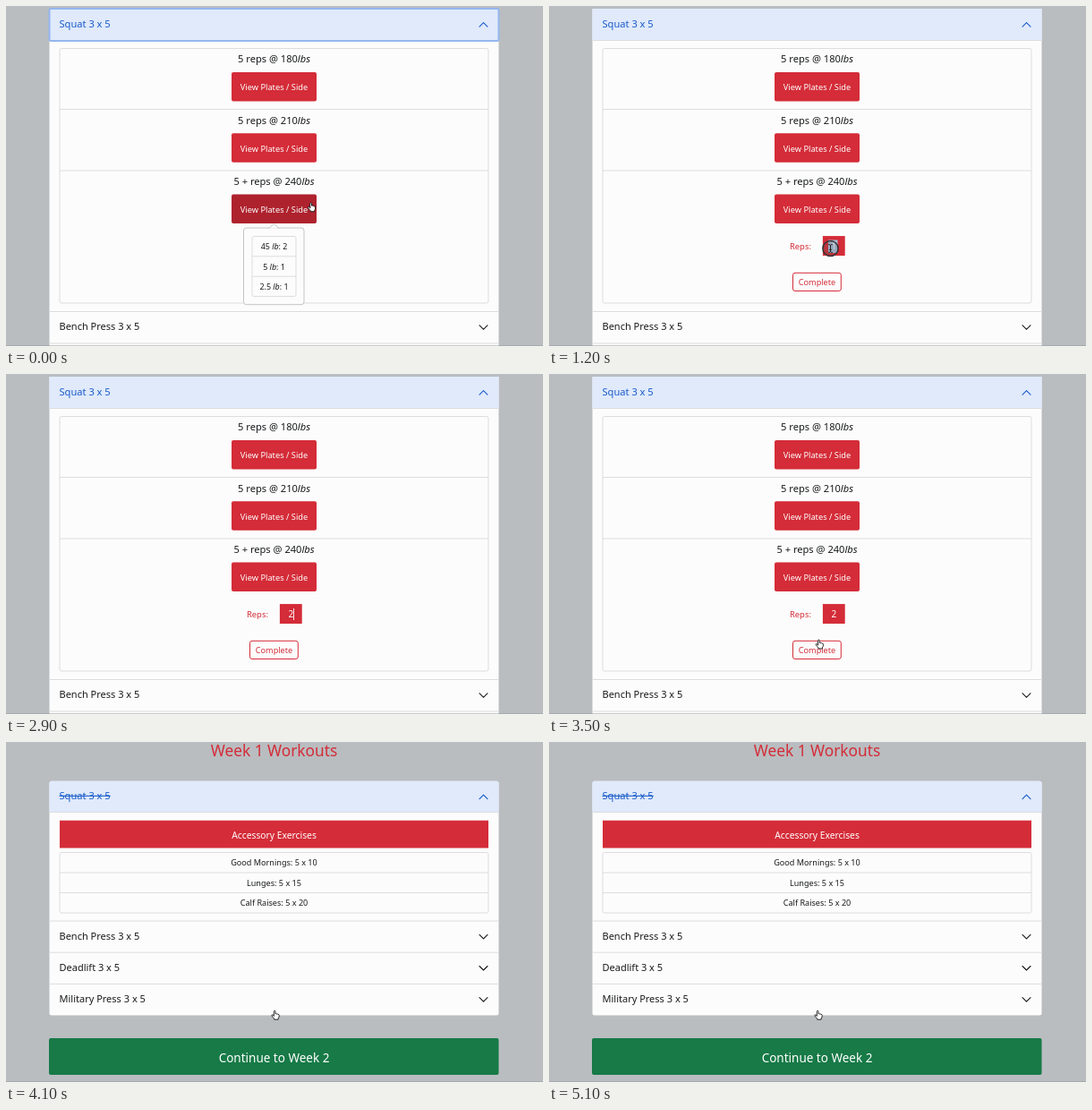
Recreate the animation shown at these times as an HTML page. Size 600 by 380 pixels, loop 5200 ms.

```html
<!DOCTYPE html>
<html lang="en">
<head>
<meta charset="utf-8">
<title>Workout tracker</title>
<style>
  html, body { margin: 0; width: 100%; height: 100%; overflow: hidden; background: #b9bdc0; }
  svg { display: block; width: 600px; height: 380px; }
  text { font-family: "Noto Sans", "Open Sans", sans-serif; white-space: pre; }
</style>
</head>
<body>
<svg id="stage" viewBox="0 0 600 380"></svg>
<script>
const LOOP = 5200;
const RED = '#d42c38', DARK_RED = '#ae222d', BLUE = '#1859c9', INK = '#181a1c';
const PAPER = '#fcfcfc', LINE = '#dddddf', HEADER = '#e0eafb';
const MID = 299.5;
const stage = document.getElementById('stage');

function add(parent, tag, attrs, html = '') {
  const node = document.createElementNS('http://www.w3.org/2000/svg', tag);
  set(node, attrs);
  node.innerHTML = html;
  return parent.appendChild(node);
}
function set(node, attrs) {
  for (const key in attrs) node.setAttribute(key, attrs[key]);
}
const group = (parent, attrs = {}) => add(parent, 'g', attrs);
const rect = (parent, x, y, right, bottom, attrs) =>
  add(parent, 'rect', { x, y, width: right - x, height: bottom - y, ...attrs });
const label = (parent, x, y, size, fill, html, attrs = {}) =>
  add(parent, 'text', { x, y, 'font-size': size, fill, ...attrs }, html);
const centred = (parent, y, size, fill, html, attrs = {}) =>
  label(parent, MID, y, size, fill, html, { 'text-anchor': 'middle', ...attrs });
const rule = (parent, y, x = 49, right = 550) =>
  add(parent, 'path', { d: `M${x} ${y}H${right}`, stroke: LINE });
const chevron = (parent, y, up) => add(parent, 'path', {
  d: up ? `M529 ${y + 2.2}l4.5 -4.5l4.5 4.5` : `M529 ${y - 2.2}l4.5 4.5l4.5 -4.5`,
  fill: 'none', stroke: up ? BLUE : INK, 'stroke-width': 1.1,
  'stroke-linecap': 'round', 'stroke-linejoin': 'round'
});
const medium = { 'font-weight': 500 };
const italic = text => `<tspan font-style="italic">${text}</tspan>`;

function exerciseRow(parent, top, name) {
  rule(parent, top);
  label(parent, 59.5, top + 20.5, 11, INK, name, medium);
  chevron(parent, top + 17.5, false);
}

function listBox(parent, x, top, right, bottom, dividers) {
  rect(parent, x, top, right, bottom, { fill: PAPER, stroke: LINE, rx: 2 });
  dividers.forEach(y => rule(parent, y, x, right));
}

// Set view
const setView = group(stage);
rect(setView, 48.5, 3, 550.5, 381, { fill: PAPER });
rect(setView, 48.5, 3, 550.5, 38.5, { fill: HEADER });
rule(setView, 38.5);
const headerRing = rect(setView, 48.5, 3, 550.5, 39, {
  fill: 'none', stroke: '#94b6ee', 'stroke-width': 2, rx: 2
});
label(setView, 59.5, 24, 11.1, BLUE, 'Squat 3 x 5', medium);
chevron(setView, 21, true);
listBox(setView, 60, 47.5, 539, 332, [115.5, 184]);
const plateButtons = ['5 reps @ 180', '5 reps @ 210', '5 + reps @ 240'].map((text, i) => {
  const y = i * 68.3;
  centred(setView, 63.3 + y, 11.1, INK, text + italic('lbs'), medium);
  const button = rect(setView, 252, 74 + y, 347, 106.4 + y, { fill: RED, rx: 2 });
  centred(setView, 94.3 + y, 9.25, '#fff', 'View Plates / Side');
  return button;
});
label(setView, 269, 271.5, 9.4, RED, 'Reps:');
const input = rect(setView, 306.6, 257.8, 330, 278.4, { stroke: RED, 'stroke-width': 1.4 });
const selection = rect(setView, 312, 261.5, 322.5, 276, { fill: '#a9bfdc' });
const digit = label(setView, 318.3, 272, 10, RED, '1', { 'text-anchor': 'middle' });
const caret = rect(setView, 321, 262, 321.9, 275, { fill: '#fff' });
const completeRing = rect(setView, 271, 297, 327.5, 320, {
  fill: 'none', stroke: RED, 'stroke-opacity': .45, 'stroke-width': 2.4, rx: 3.5
});
const complete = rect(setView, 272.5, 298.3, 326.3, 318.5, { stroke: RED, rx: 2.5 });
const completeText = centred(setView, 312, 9.15, RED, 'Complete');
exerciseRow(setView, 341.5, 'Bench Press 3 x 5');
rule(setView, 377);

const popover = group(setView);
rect(popover, 265.5, 248, 333, 333.7, { fill: PAPER, stroke: '#c4c4c6', rx: 3 });
add(popover, 'path', { d: 'M293.5 248.5L299.3 243.5L305 248.5', fill: PAPER, stroke: '#c4c4c6' });
listBox(popover, 275, 257.5, 324, 324.6, [279.8, 302.2]);
[['45', 2], ['5', 1], ['2.5', 1]].forEach(([weight, count], i) =>
  centred(popover, 272 + i * 22.5, 8.9, INK, `${weight} ${italic('lb')}: ${count}`));

// Week view
const weekView = group(stage);
centred(weekView, 15.8, 17.3, RED, 'Week 1 Workouts', medium);
rect(weekView, 48.5, 43.7, 550.5, 305.5, { fill: PAPER, rx: 2.5 });
rect(weekView, 48.5, 43.7, 550.5, 78.5, { fill: HEADER, rx: 2 });
rule(weekView, 78.5);
label(weekView, 59.5, 64.3, 11.1, BLUE, 'Squat 3 x 5', { ...medium, 'text-decoration': 'line-through' });
chevron(weekView, 61.5, true);
rect(weekView, 60, 87.7, 539, 118.5, { fill: RED });
centred(weekView, 107.6, 10.3, '#fff', 'Accessory Exercises', medium);
listBox(weekView, 60, 123.5, 539, 191, [146, 168.5]);
['Good Mornings: 5 x 10', 'Lunges: 5 x 15', 'Calf Raises: 5 x 20'].forEach((text, i) =>
  centred(weekView, 138.4 + i * 22.5, 9.1, INK, text, medium));
['Bench Press 3 x 5', 'Deadlift 3 x 5', 'Military Press 3 x 5'].forEach((name, i) =>
  exerciseRow(weekView, 200 + i * 35.2, name));
rect(weekView, 48, 331, 550.5, 372, { fill: '#177a47', rx: 2 });
centred(weekView, 357.5, 13.5, '#fff', 'Continue to Week 2');

rect(stage, 0, 379.2, 600, 380, { fill: '#8f9395', opacity: .6 });

// Pointers, each drawn around its centre
const pointer = group(stage, { 'stroke-linejoin': 'round', 'stroke-linecap': 'round' });
const hand = add(pointer, 'path', {
  d: 'M-1.7 1V-3.6Q-1.7 -4.7 -.8 -4.7Q0 -4.7 0 -3.6V-1.3Q.8 -1.9 1.5 -1Q2.3 -1.5 2.9 -.6Q4.2 -.8 4.2 .6' +
     'Q4.2 3 3.1 4V5.2H-1.3V4.2Q-2.7 3 -4 .9Q-4.3 -.2 -3.3 -.2Q-2.5 0 -1.7 1Z',
  fill: '#fff', stroke: '#151515', 'stroke-width': .9
});
const arrow = add(pointer, 'path', {
  d: 'M-2.5 -5V4L-.5 2.2L.8 5.2L2.2 4.6L1 1.7H3.8Z',
  fill: '#111', stroke: '#fff', 'stroke-width': .7
});
const pressRing = add(pointer, 'circle', {
  r: 8.6, fill: '#555', 'fill-opacity': .22, stroke: '#333', 'stroke-width': 1.5
});
const beam = add(pointer, 'path', {
  d: 'M-1.8 -4.5Q0 -4.5 0 -3.3Q0 -4.5 1.8 -4.5M0 -3.3V3.3M-1.8 4.5Q0 4.5 0 3.3Q0 4.5 1.8 4.5M-1 1.3H1',
  fill: 'none', stroke: '#222', 'stroke-width': 1
});

const path = [
  [0, 341.5, 224.5], [80, 341.5, 224.5], [480, 324.5, 275], [780, 324, 271],
  [1150, 314.5, 271], [3080, 314.5, 271], [3600, 301, 305], [LOOP, 301, 305]
];
const progress = (t, start, length) => Math.min(1, Math.max(0, (t - start) / length));
const between = (t, start, end) => t >= start && t < end;
const show = (node, visible) => set(node, { visibility: visible ? 'inherit' : 'hidden' });

function pointerAt(t) {
  const i = path.findIndex(([time]) => time > t);
  const [t0, x0, y0] = path[i - 1], [t1, x1, y1] = path[i];
  const u = progress(t, t0, t1 - t0), k = u * u * (3 - 2 * u);
  return [x0 + (x1 - x0) * k, y0 + (y1 - y0) * k];
}

function mix(from, to, k) {
  const channel = (hex, i) => parseInt(hex.slice(i, i + 2), 16);
  return `rgb(${[1, 3, 5].map(i => Math.round(channel(from, i) + (channel(to, i) - channel(from, i)) * k))})`;
}

function render(t) {
  const [x, y] = pointerAt(t);
  const finished = t >= 4050;
  set(setView, { display: finished ? 'none' : 'inline' });
  set(weekView, { display: finished ? 'inline' : 'none' });

  set(popover, { opacity: 1 - progress(t, 200, 150) });
  set(plateButtons[2], { fill: mix(DARK_RED, RED, progress(t, 200, 150)) });
  set(headerRing, { opacity: 1 - progress(t, 750, 150) });

  const focused = between(t, 750, 3780);
  set(input, { fill: focused ? RED : PAPER });
  set(digit, { fill: focused ? '#fff' : RED });
  digit.textContent = t < 2100 ? '1' : '2';
  show(selection, between(t, 950, 2100));
  show(caret, between(t, 2100, 2500) || between(t, 2900, 3400));

  const hover = progress(t, 3500, 150);
  set(complete, { fill: mix(PAPER, RED, hover) });
  set(completeText, { fill: mix(RED, '#ffffff', hover) });
  set(completeRing, { opacity: progress(t, 3780, 150) });

  const overInput = !finished && between(x, 306, 331) && between(y, 257, 279);
  const overButton = finished || y < 243 || y > 298;
  set(pointer, { transform: `translate(${x} ${y})` });
  show(pointer, !between(t, 2100, 3100));
  show(beam, overInput);
  show(hand, overButton);
  show(arrow, !overInput && !overButton);
  show(pressRing, between(t, 750, 1300));
}

const start = performance.now();
function tick() {
  render((performance.now() - start) % LOOP);
  requestAnimationFrame(tick);
}
render(0);
requestAnimationFrame(tick);
</script>
</body>
</html>
```
